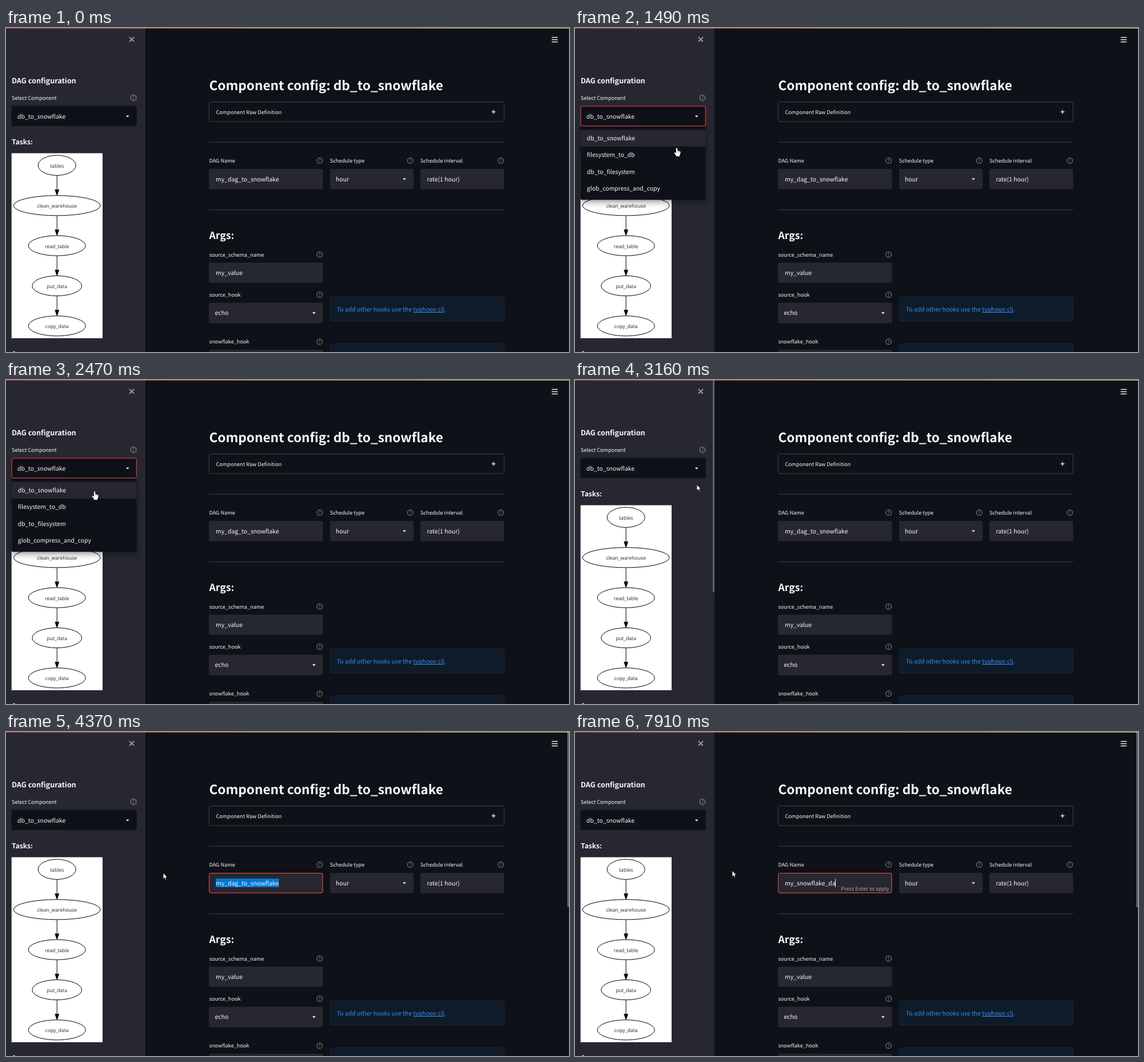
An HTML page with a canvas for the animation above (8 s loop, 985 px wide and 568 px high).

```html
<!DOCTYPE html>
<html lang="en">
<head>
<meta charset="utf-8">
<title>Component config</title>
<style>
html, body { margin: 0; width: 100%; height: 100%; overflow: hidden; background: #0e1117; }
canvas { display: block; width: 985px; height: 568px; }
</style>
</head>
<body>
<canvas id="stage"></canvas>
<script>
const W = 985, H = 568, LOOP = 8000;
const SANS = '"Noto Sans CJK JP", "Noto Sans CJK SC", "Noto Sans CJK", sans-serif';
const BG = '#0e1117', PANEL = '#262730', INK = '#fafafa', RED = '#ff4b4b';
const DIM = 'rgba(250,250,250,.6)', LINE = 'rgba(250,250,250,.2)';
const BODY = 10.45, SMALL = 9.14;

const canvas = document.getElementById('stage');
const dpr = window.devicePixelRatio || 1;
canvas.width = W * dpr;
canvas.height = H * dpr;
const c = canvas.getContext('2d');

// Pointer path: time, x, y of the tip
const PATH = [
  [110, 700, 465], [260, 470, 356], [345, 470, 356], [720, 185, 200],
  [815, 185, 200], [960, 196, 152], [1255, 196, 152], [1490, 178, 210],
  [1650, 182, 250], [1725, 182, 250], [1875, 176, 230], [2100, 168, 271],
  [2175, 168, 271], [2325, 161, 202], [2470, 155, 195], [2550, 155, 190],
  [3085, 155, 190], [3460, 445, 156], [3545, 445, 156], [3770, 478, 284],
  [3920, 486, 270], [3995, 486, 270], [4370, 275, 247], [4520, 275, 243]
];
const STEP = 75;

// Typing: time, length of NAME, caret shown
const NAME = 'my_snowflake_da';
const KEYS = [
  [5160, 1, 1], [5460, 2, 1], [5760, 2, 0], [5910, 3, 1], [6370, 3, 0],
  [6450, 4, 1], [6520, 5, 1], [6600, 6, 1], [6830, 7, 1], [6910, 8, 1],
  [7130, 8, 0], [7280, 9, 1], [7360, 10, 1], [7430, 11, 1], [7510, 12, 1],
  [7760, 13, 1], [7910, 15, 1]
];

const OPEN = 1030, CLOSE = 3160, FOCUS = 4070, FIRST_KEY = KEYS[0][0];
const OPTIONS = ['db_to_snowflake', 'filesystem_to_db', 'db_to_filesystem', 'glob_compress_and_copy'];
const ROW_TOP = 178.6, ROW_H = 29.2;
const NODES = [
  ['tables', 240.8, 33], ['clean_warehouse', 311.3, 76], ['read_table', 381.6, 50],
  ['put_data', 452, 43.3], ['copy_data', 522.3, 50]
];

const within = (p, x, y, w, h) => p && p.x >= x && p.x <= x + w && p.y >= y && p.y <= y + h;

function setFont(size, weight = 400, family = SANS) {
  c.font = `${weight} ${size}px ${family}`;
}

function text(str, x, y, size = BODY, color = INK, weight = 400, align = 'left', family = SANS) {
  setFont(size, weight, family);
  c.fillStyle = color;
  c.textAlign = align;
  c.fillText(str, x, y);
}

function rect(x, y, w, h, color) {
  c.fillStyle = color;
  c.fillRect(x, y, w, h);
}

function box(x, y, w, h, fill, stroke) {
  c.beginPath();
  c.roundRect(x, y, w, h, 3);
  if (fill) { c.fillStyle = fill; c.fill(); }
  if (stroke) {
    c.beginPath();
    c.roundRect(x + .5, y + .5, w - 1, h - 1, 3);
    c.strokeStyle = stroke;
    c.lineWidth = 1;
    c.stroke();
  }
}

function poly(points, fill, stroke, width = 1) {
  c.beginPath();
  points.forEach(([x, y]) => c.lineTo(x, y));
  c.closePath();
  if (fill) { c.fillStyle = fill; c.fill(); }
  if (stroke) { c.strokeStyle = stroke; c.lineWidth = width; c.stroke(); }
}

function segment(x1, y1, x2, y2, color, width) {
  c.beginPath();
  c.moveTo(x1, y1);
  c.lineTo(x2, y2);
  c.strokeStyle = color;
  c.lineWidth = width;
  c.stroke();
}

function help(x, y) {
  c.beginPath();
  c.arc(x, y, 4.9, 0, 7);
  c.strokeStyle = 'rgba(250,250,250,.55)';
  c.lineWidth = 1;
  c.stroke();
  text('?', x, y + 2.9, 7.4, DIM, 400, 'center');
}

function label(str, x, y, helpX) {
  text(str, x, y + 3.8, SMALL);
  if (helpX) help(helpX, y + .3);
}

function chevron(x, y) {
  poly([[x - 3, y - 1.5], [x + 3, y - 1.5], [x, y + 1.6]], INK);
}

function field(str, x, y, w, textX, arrowX) {
  box(x, y, w, 35.6, PANEL);
  if (str) text(str, textX, y + 21.6);
  if (arrowX) chevron(arrowX, y + 18);
}

function pointerAt(t) {
  if (t < PATH[0][0]) return null;
  const i = PATH.findIndex(k => k[0] > t);
  const a = PATH[i < 0 ? PATH.length - 1 : i - 1], b = i < 0 ? a : PATH[i];
  const u = a === b ? 0 : Math.floor((t - a[0]) / STEP) * STEP / (b[0] - a[0]);
  return { x: a[1] + (b[1] - a[1]) * u, y: a[2] + (b[2] - a[2]) * u };
}

function drawGraph() {
  rect(9.7, 219.5, 159.3, 324.3, '#fff');
  NODES.forEach(([name, y, rx], i) => {
    c.beginPath();
    c.ellipse(89.2, y, rx, 17.6, 0, 0, 7);
    c.strokeStyle = '#000';
    c.lineWidth = 1;
    c.stroke();
    text(name, 89.2, y + 4, 8.67, '#222', 400, 'center', '"Open Sans", sans-serif');
    if (i < NODES.length - 1) {
      const end = NODES[i + 1][1] - 17.8;
      segment(89.2, y + 17.6, 89.2, end - 9, '#000', 1);
      poly([[85.8, end - 10], [92.6, end - 10], [89.2, end]], '#000', '#000', .8);
    }
  });
}

function drawSidebar(open) {
  rect(0, 0, 244, H, PANEL);
  segment(216, 16, 224, 24, '#96979c', 2);
  segment(224, 16, 216, 24, '#96979c', 2);
  text('DAG configuration', 10, 97, 12.65, INK, 700);
  label('Select Component', 10, 122, 223);
  text('Tasks:', 10, 203.6, 12.1, INK, 700);
  text('Args:', 10, 576, 12.65, INK, 700);
  drawGraph();
  box(9.5, 136.5, 219.3, 35.6, BG, open && RED);
  text(OPTIONS[0], 20, 158.6);
  chevron(212.7, 155);
}

function drawMenu(t) {
  c.save();
  c.shadowColor = 'rgba(0,0,0,.45)';
  c.shadowBlur = 12 * dpr;
  c.shadowOffsetY = 3 * dpr;
  box(9.5, 173, 219, 128.2, BG);
  c.restore();
  const p = pointerAt(t - 100);
  const active = Math.max(0, Math.min(3, Math.floor((p.y - ROW_TOP) / ROW_H)));
  rect(9.5, ROW_TOP + active * ROW_H, 219, ROW_H, PANEL);
  OPTIONS.forEach((name, i) => text(name, 20.8, ROW_TOP + i * ROW_H + 18.6, BODY, INK, 500));
}

const LINK = new Path2D('M10 13a5 5 0 0 0 7.54.54l3-3a5 5 0 0 0-7.07-7.07l-1.72 1.71M14 11a5 5 0 0 0-7.54-.54l-3 3a5 5 0 0 0 7.07 7.07l1.71-1.71');

function anchor(y) {
  c.beginPath();
  c.arc(335, y, 14.6, 0, 7);
  c.fillStyle = '#161920';
  c.fill();
  c.save();
  c.translate(328.6, y - 6.4);
  c.scale(.535, .535);
  c.strokeStyle = '#d5d6d8';
  c.lineWidth = 1.9;
  c.lineCap = 'round';
  c.stroke(LINK);
  c.restore();
}

function drawName(t) {
  const x = 367, base = 268.6;
  const key = KEYS.filter(k => k[0] <= t).pop();
  box(355, 247, 199.5, 35.6, PANEL, t >= FOCUS && RED);
  setFont(BODY);
  if (!key) {
    const full = 'my_dag_to_snowflake';
    if (t >= FOCUS) {
      const end = c.measureText(full).width;
      const from = Math.max(0, Math.min(end, pointerAt(t).x - x));
      rect(x + from, 257, end - from, 15, '#0078d7');
    }
    text(full, x, base);
    return;
  }
  const typed = NAME.slice(0, key[1]);
  text(typed, x, base);
  if (key[2]) rect(Math.round(x + c.measureText(typed).width - .4), 257.5, 1, 14.5, INK);
  text('Press Enter to apply', 549.6, 278, SMALL, DIM, 400, 'right');
}

function drawMain(t, p) {
  segment(954.8, 16.5, 965.2, 16.5, INK, 1.4);
  segment(954.8, 20.5, 965.2, 20.5, INK, 1.4);
  segment(954.8, 24.5, 965.2, 24.5, INK, 1.4);

  if (t >= 260 && t < 420) anchor(357);
  if (t >= 3385 && t < 3620) anchor(94.5);
  text('Component config: db_to_snowflake', 355.5, 109, 22.6, INK, 700);

  const tone = within(p, 355, 129, 517, 35) ? RED : INK;
  box(355, 129, 517, 35.6, null, LINE);
  text('Component Raw Definition', 367.5, 150.6, SMALL, tone);
  segment(849.5, 147, 856.5, 147, tone, 1.3);
  segment(853, 143.5, 853, 150.5, tone, 1.3);
  rect(355, 199.5, 517, 1, LINE);
  rect(355, 318, 517, 1, LINE);

  label('DAG Name', 355.5, 232.2, 548.7);
  label('Schedule type', 566.7, 232.2, 707.3);
  label('Schedule interval', 725, 232.2, 865.7);
  drawName(t);
  field('hour', 567, 247, 146.3, 577, 697);
  field('rate(1 hour)', 725, 247, 146.5, 736.5);

  text('Args:', 355.5, 369.8, 17.6, INK, 700);
  label('source_schema_name', 355.5, 396.8, 548.7);
  field('my_value', 355, 411.2, 199.5, 367);
  label('source_hook', 355.5, 467.3, 548.7);
  field('echo', 355, 481.8, 199.5, 365.5, 538.8);
  label('snowflake_hook', 355.5, 549.6, 548.7);
  field('', 355, 564, 199.5);

  box(566.8, 470.8, 305.4, 43.4, '#101b29', '#12253a');
  box(566.8, 553, 305.4, 43.4, '#101b29', '#12253a');
  const blue = '#3190f0', hint = 'To add other hooks use the ', link = 'typhoon cli';
  text(hint, 578.7, 496.6, BODY, blue);
  const linkX = 578.7 + c.measureText(hint).width;
  const linkW = c.measureText(link).width;
  text(link, linkX, 496.6, BODY, blue);
  text('.', linkX + linkW, 496.6, BODY, blue);
  rect(linkX, 498, linkW, 1, blue);
}

const ARROW = [[0, 0], [0, 10.8], [2.5, 8.6], [4.1, 12.2], [5.8, 11.4], [4.2, 8], [7.4, 7.8]];
const HAND = new Path2D('M-1.2 1Q0-.6 1.2 1V5.2Q2.4 4.6 3 5.6Q4.2 5 4.8 6.1Q6.4 5.6 6.5 7.3V10.2L5.2 12.8V15H-1.2V13.4L-4.2 9.4Q-4.6 7.6-3 8L-1.2 9.4Z');

function drawPointer(p, open) {
  const hand = within(p, 9, 136, 220, open ? 160 : 36) || within(p, 355, 129, 517, 35);
  c.save();
  c.translate(p.x, p.y);
  c.lineJoin = 'round';
  if (hand) {
    c.fillStyle = '#fff';
    c.strokeStyle = '#000';
    c.lineWidth = 1.2;
    c.stroke(HAND);
    c.fill(HAND);
    for (const x of [1.2, 3, 4.8]) segment(x, 6.2, x, 8.2, '#555', .6);
  } else if (within(p, 355, 247, 199.5, 36)) {
    segment(0, -6, 0, 6, '#fff', 1);
    segment(-2.5, -6, 2.5, -6, '#fff', 1);
    segment(-2.5, 6, 2.5, 6, '#fff', 1);
  } else {
    poly(ARROW, '#fff', '#000', .8);
  }
  c.restore();
}

function draw(t) {
  const p = pointerAt(t), open = t >= OPEN && t < CLOSE;
  c.setTransform(dpr, 0, 0, dpr, 0, 0);
  c.textRendering = 'geometricPrecision';
  rect(0, 0, W, H, BG);
  drawMain(t, p);
  drawSidebar(open);
  if (p) {
    const thumb = '#62646a';
    if (p.x >= 244) rect(982, 0, 3, 307, thumb);
    else if (!open || p.y < 173) rect(241, 0, 3, 372, thumb);
  }
  const bar = c.createLinearGradient(0, 0, W, 0);
  bar.addColorStop(0, '#ff4b4b');
  bar.addColorStop(1, '#fffd80');
  c.globalAlpha = .75;
  rect(0, 0, W, 1, bar);
  c.globalAlpha = 1;
  if (open) {
    drawMenu(t);
    if (t >= 1500 && t < 2990 && (t - 1500) % 990 < 490) rect(106, 147, 1, 15, INK);
  }
  if (p) drawPointer(p, open);
}

const start = performance.now();
function tick(now) {
  draw(Math.max(0, now - start) % LOOP);
  requestAnimationFrame(tick);
}
draw(0);
requestAnimationFrame(tick);
</script>
</body>
</html>
```
